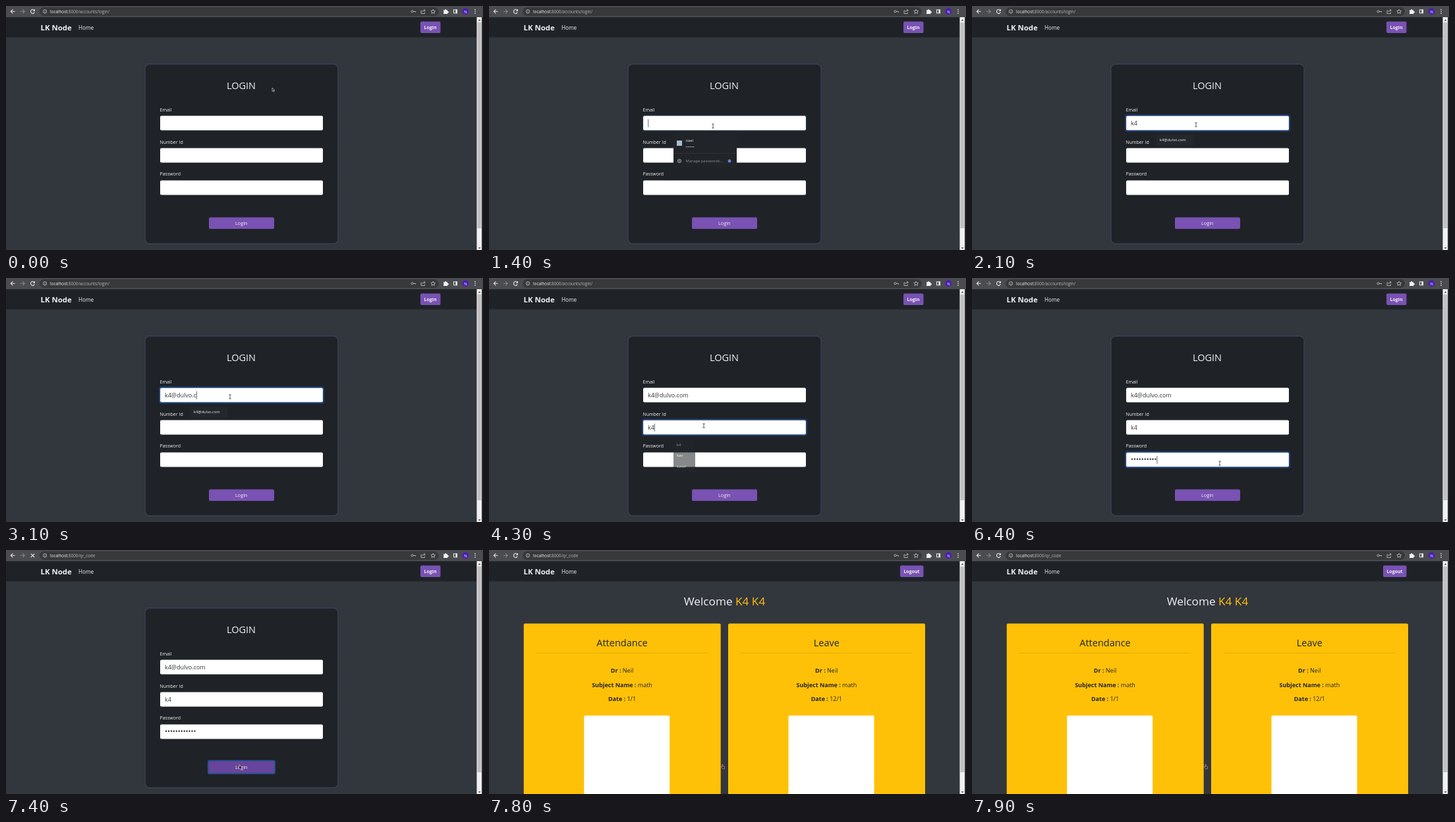
Animation, 724 px wide and 370 px high, one loop 8000 ms. Source, as an HTML page:

```html
<!DOCTYPE html>
<html lang="en">
<head>
<meta charset="utf-8">
<title>Login demo</title>
<style>
  html, body { margin: 0; width: 100%; height: 100%; overflow: hidden; background: #32363d; }
  svg { display: block; font-family: 'Open Sans', 'Noto Sans', sans-serif; }
  text { fill: #f1f2f3; white-space: pre; }
  .mid { text-anchor: middle; }
  .label { font-size: 7px; }
  .value { font-size: 9px; fill: #33373b; }
  .small { font-size: 5.8px; }
  .bold { font-weight: 700; }
  .icon { fill: none; stroke: #e4e5e7; stroke-width: 1.1; }
  .dark text { fill: #212529; font-size: 9px; text-anchor: middle; }
  .dark .title { font-size: 14.5px; font-weight: 500; }
</style>
</head>
<body>
<svg width="724" height="370" viewBox="0 0 724 370">
  <defs>
    <g id="panel">
      <rect width="96" height="53" rx="1.5" fill="#212428"/>
      <rect x="5" y="12" width="8" height="8" fill="#a9bccb"/>
      <text class="small" x="18.5" y="13.5">nael</text>
      <text class="small" x="18.5" y="23.5">••••••</text>
      <path d="M0 31.5H96" stroke="#2f3337"/>
      <circle cx="9" cy="43" r="2.6" fill="none" stroke="#a6a9ac"/>
      <circle cx="9" cy="43" r="1" fill="#a6a9ac"/>
      <text class="small" x="18.5" y="45" style="fill:#8d9195">Manage passwords...</text>
      <circle cx="85" cy="43" r="2.5" fill="#5f7fd0"/>
    </g>
  </defs>

  <!-- page -->
  <rect width="724" height="370" fill="#32363d"/>
  <rect y="17" width="715" height="30.5" fill="#1f2327"/>
  <text class="bold" x="52.5" y="36.8" font-size="11.4">LK Node</text>
  <text x="110" y="35.5" font-size="8.2">Home</text>
  <rect id="navBtn" y="23.5" height="17.5" rx="2" fill="#7952b3"/>
  <text id="navText" class="mid bold" y="35.3" font-size="7">Login</text>

  <g id="login">
    <rect x="211" y="88" width="293" height="272.5" rx="7" fill="#1f2327" stroke="#3d4059" stroke-width="1.3"/>
    <text class="mid" x="357" y="125.5" font-size="14.5" font-weight="500">LOGIN</text>
    <text class="label" x="233.5" y="159.6">Email</text>
    <text class="label" x="233.5" y="208.6">Number Id</text>
    <text class="label" x="233.5" y="257.4">Password</text>
    <g fill="#fff">
      <rect x="234" y="166.5" width="247" height="22" rx="2"/>
      <rect x="234" y="215.5" width="247" height="22" rx="2"/>
      <rect x="234" y="264.5" width="247" height="22" rx="2"/>
    </g>
    <rect id="ring" x="233.2" width="248.6" height="23.6" rx="2.6" fill="none" stroke="#1f4789" stroke-width="1.8"/>
    <text class="value" x="241" y="181.4"></text>
    <text class="value" x="241" y="230.4"></text>
    <text class="value" x="241" y="279.4" style="font-size:10.5px"></text>
    <rect id="caret" width="0.9" height="12" fill="#55595e"/>
    <rect id="submit" x="308" y="320.5" width="99" height="17.5" rx="2" fill="#7952b3" stroke="#24528f" stroke-width="0"/>
    <text class="mid" x="357.3" y="332.2" font-size="7.3">Login</text>
    <use id="panel1" href="#panel" x="280" y="192"/>
    <use id="panel2" href="#panel" x="280" y="290"/>
    <g id="mailList">
      <rect x="280" y="195" width="56" height="16.5" rx="1" fill="#24282c"/>
      <text class="small" x="285" y="205.3">k4@dulvo.com</text>
    </g>
    <g id="idList">
      <rect x="280" y="244" width="33" height="51" rx="1" fill="#24282c"/>
      <text class="small" x="285" y="254.8">k4</text>
      <text class="small" x="285" y="271.2">kav</text>
      <text class="small" x="285" y="287.6">kavel</text>
    </g>
  </g>

  <g id="welcome">
    <text class="mid" x="357.5" y="84.3" font-size="17.2" font-weight="500">Welcome <tspan fill="#ffc107">K4 K4</tspan></text>
    <g id="cards" class="dark"></g>
  </g>

  <!-- browser frame -->
  <rect width="724" height="17" fill="#4b4c4f"/>
  <rect x="51" y="2" width="606" height="13" rx="6.5" fill="#38393b"/>
  <g class="icon">
    <path d="M13.5 8.3H7.5M10.3 5.3l-3 3 3 3"/>
    <path d="M22 8.3h6M25.200 5.300l3 3-3 3" stroke="#85878a"/>
    <path id="reload" d="M43 6.700A3 3 0 1 0 43.300 9.300M43.400 4.900V7.200H41"/>
    <path id="stop" d="M37.800 5.600l5.400 5.400M43.200 5.600l-5.400 5.400"/>
    <g stroke-width="0.8" stroke="#c6c8ca">
      <circle cx="59" cy="8.300" r="2.700"/>
      <path d="M59 8v1.800M59 6.600v.6"/>
      <circle cx="616.500" cy="8.300" r="1.600"/>
      <path d="M618 8.300h3.500v1.500"/>
      <path d="M631.500 7h-1.500v4.500h5.500V9.500M632 9.300c.3-2 1.500-2.700 4-2.700M634.300 4.800l2 1.800-2 1.800"/>
      <path d="M648.200 5l1 2.200 2.400.2-1.800 1.600.6 2.400-2.200-1.300-2.200 1.300.6-2.400-1.800-1.600 2.400-.2z"/>
    </g>
    <path d="M679.500 5.800h5v5h-5z"/>
  </g>
  <g fill="#f1f2f3">
    <path d="M664 6.300h2a1.200 1.200 0 1 1 2.400 0h1.800v2a1.200 1.200 0 1 1 0 2v1.700H664v-2a1.200 1.200 0 0 0 0-2z"/>
    <path d="M682.500 5.500h2.500v5.600h-2.500z"/>
    <circle cx="712" cy="5.500" r=".8"/><circle cx="712" cy="8.300" r=".8"/><circle cx="712" cy="11.100" r=".8"/>
  </g>
  <circle cx="697.500" cy="8.300" r="5" fill="#4a1fb5"/>
  <text class="mid" x="697.500" y="10.500" font-size="6">N</text>
  <text x="67" y="10.700" font-size="6.300">localhost<tspan id="path" fill="#b4b7ba"></tspan></text>
  <rect x="714.500" y="17" width="7.800" height="353" fill="#f1f1f1"/>
  <rect x="715.500" y="25" width="6" height="312" fill="#c1c1c1"/>
  <path d="M716.600 22.500h4l-2-2.500zM716.600 366h4l-2 2.500z" fill="#606060"/>
  <rect x="722.300" y="17" width="1.700" height="353" fill="#25282c"/>

  <!-- pointers, centred on their own origin -->
  <g id="pointer" stroke-linejoin="round">
    <path id="arrow" d="M-1.500-3v5.500l1.400-1.200 1 2 .9-.4-.9-1.900h1.700z" fill="#33282c" stroke="#cbbcc0" stroke-width=".7"/>
    <path id="beam" d="M-1.800-3h3.600M0-3v6M-1.800 3h3.600" fill="none" stroke="#4b4f54" stroke-width=".9"/>
    <path id="hand" d="M-1-3.500v4l-1.500-.6 2 3.400h3V-.2L-.1-.8v-2.700z" fill="#3b2530" stroke="#d3a9a6" stroke-width=".6"/>
  </g>
</svg>
<script>
const $ = id => document.getElementById(id);
const show = (id, opacity) => $(id).setAttribute('opacity', +opacity);
const set = (id, attrs) => { for (const k in attrs) $(id).setAttribute(k, attrs[k]); };
const between = (t, a, b) => t >= a && t < b;
const values = [...document.querySelectorAll('.value')];

const card = (x, title, date) => {
  const c = x + 149.3;
  const row = (y, key, val) => `<text x="${c}" y="${y}"><tspan class="bold">${key} :</tspan> ${val}</text>`;
  return `<rect x="${x}" y="111.5" width="299" height="262" rx="2" fill="#ffc107"/>
    <text class="title" x="${c}" y="145.700">${title}</text>
    <path d="M${x + 19} 156.300h261" stroke="#d9a70e" stroke-width=".8"/>
    ${row(186, 'Dr', 'Neil')}${row(207.500, 'Subject Name', 'math')}${row(229.300, 'Date', date)}
    <rect x="${x + 91.500}" y="251" width="130" height="125" rx="2" fill="#fff"/>`;
};
$('cards').innerHTML = card(52.7, 'Attendance', '1/1') + card(363, 'Leave', '12/1');

// Times at which each character is typed
const typed = [
  [1700, 1800, 2300, 2600, 2600, 2700, 2700, 2900, 3000, 3100, 3300, 3400],
  [4000, 4100],
  [5200, 5400, 5500, 5600, 5700, 5800, 6000, 6200, 6400, 6400, 6500, 6700]
];
const texts = ['k4@dulvo.com', 'k4', '•'.repeat(12)];

// Pointer stops: time, x, y
const stops = [
  [0, 405.5, 127], [100, 405.5, 127], [900, 395, 169], [1300, 340, 182], [1400, 340, 182],
  [1500, 340, 180], [3500, 340, 180], [3900, 326, 224], [4300, 326, 224], [4700, 376, 281],
  [6800, 376, 281], [7200, 355, 328.5], [8000, 355, 328.5]
];

// Fades a pop-up in and out: half visible for one step at the start, then down over two steps
const popup = (t, start, end, first) =>
  between(t, start, end) ? (t < start + 100 ? 0.5 : 1)
  : between(t, end, end + 100) ? first
  : between(t, end + 100, end + 200) ? first / 3 : 0;

function pointerAt(t) {
  const i = stops.findIndex(s => s[0] > t);
  const [t0, x0, y0] = stops[i - 1], [t1, x1, y1] = stops[i];
  const k = (t - t0) / (t1 - t0), e = k * k * (3 - 2 * k);
  return [x0 + (x1 - x0) * e, y0 + (y1 - y0) * e];
}

function draw(t) {
  const done = t >= 7800;
  const focus = between(t, 1200, 3800) ? 0 : between(t, 3800, 4700) ? 1 : between(t, 4700, 7200) ? 2 : -1;
  show('login', !done);
  show('welcome', done);
  set('navBtn', done ? { x: 624, width: 35.5 } : { x: 629, width: 30.5 });
  set('navText', { x: done ? 641.5 : 644 });
  $('navText').textContent = done ? 'Logout' : 'Login';

  const loading = between(t, 7400, 7800);
  show('reload', !loading);
  show('stop', loading);
  $('path').textContent = ':8000/' + (t < 7400 ? 'accounts/login/' : 'qr_code');

  values.forEach((el, i) => {
    el.textContent = texts[i].slice(0, typed[i].filter(k => k <= t).length);
  });
  show('ring', focus < 0 ? 0 : t < 1500 ? 0.3 : 1);
  show('caret', focus >= 0 && !between(t, 2100, 2300));
  if (focus >= 0) {
    const el = values[focus], top = 166.5 + 49 * focus;
    set('ring', { y: top - 0.8 });
    const width = el.textContent ? el.getComputedTextLength() : 0.3;
    set('caret', { x: 241 + width, y: top + 5.2 });
  }

  show('panel1', popup(t, 1300, 1700, 0.3));
  show('mailList', between(t, 1800, 3300) ? 1 : between(t, 3300, 3400) ? 0.4 : 0);
  show('idList', popup(t, 3900, 4300, 0.55));
  show('panel2', popup(t, 4800, 5200, 0.75));

  const pressed = t >= 7200;
  set('submit', pressed
    ? { fill: '#68449c', x: 307, y: 319.5, width: 101, height: 19.5, 'stroke-width': 2 }
    : { fill: '#7952b3', x: 308, y: 320.5, width: 99, height: 17.5, 'stroke-width': 0 });

  const [x, y] = pointerAt(t);
  const inField = !pressed && [166, 215, 264].some(top => between(y, top, top + 23));
  const shape = pressed ? 'hand' : inField ? 'beam' : 'arrow';
  for (const id of ['arrow', 'beam', 'hand']) show(id, id === shape);
  set('pointer', { transform: `translate(${x} ${y})` });
}

const start = performance.now();
function tick() {
  const t = (performance.now() - start) % 8000;
  draw(Math.floor(t / 100) * 100);
  requestAnimationFrame(tick);
}
tick();
</script>
</body>
</html>
```
